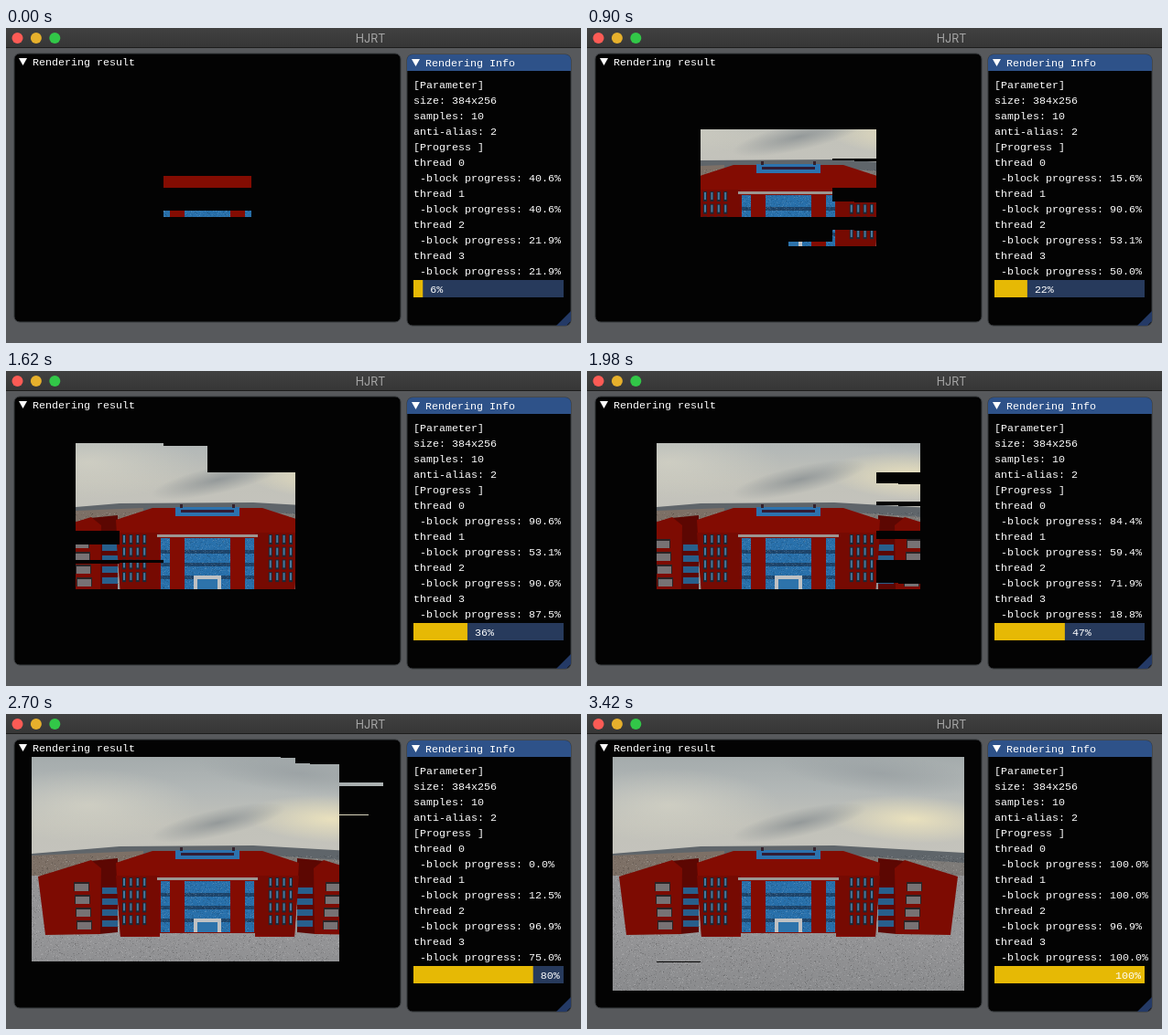
An HTML page with a canvas that plays this animation: 628 px wide and 345 px high, repeating every 3.6 s.

```html
<!DOCTYPE html>
<html lang="en">
<head>
<meta charset="utf-8">
<title>HJRT</title>
<style>
html, body { margin: 0; width: 100%; height: 100%; overflow: hidden; background: #57595c; }
canvas { display: block; }
</style>
</head>
<body>
<canvas id="stage" width="628" height="345"></canvas>
<script>
const W = 628, H = 345, STEP = 180, STEPS = 20;
const LEFT = 28, TOP = 47, BW = 48, BH = 32;
const MONO = '11.667px "Liberation Mono", monospace';
const g = document.getElementById('stage').getContext('2d');

// ---- drawing helpers
function rect(c, color, x, y, w, h) {
  c.fillStyle = color;
  c.fillRect(x, y, w, h);
}
function poly(c, color, ...p) {
  c.fillStyle = color;
  c.beginPath();
  for (let i = 0; i < p.length; i += 2) c.lineTo(p[i], p[i + 1]);
  c.fill();
}
function blob(c, rgb, a, x, y, rx, ry, tilt = 0) {
  c.save();
  c.translate(x, y);
  c.rotate(tilt);
  c.scale(rx, ry);
  const f = c.createRadialGradient(0, 0, 0, 0, 0, 1);
  f.addColorStop(0, `rgba(${rgb},${a})`);
  f.addColorStop(1, `rgba(${rgb},0)`);
  rect(c, f, -1, -1, 2, 2);
  c.restore();
}
function vertical(c, y0, y1, ...colors) {
  const f = c.createLinearGradient(0, y0, 0, y1);
  colors.forEach((color, i) => f.addColorStop(i / (colors.length - 1), color));
  return f;
}
function text(s, x, y, color = '#fff') {
  g.fillStyle = color;
  g.fillText(s, x, y);
}
let seed = 7;
const rnd = () => (seed = (seed * 16807) % 2147483647) / 2147483647;
function grain(c, n, x, y, w, h, a) {
  while (n--) {
    const v = rnd() < .5 ? 255 : 0;
    rect(c, `rgba(${v},${v},${v},${rnd() * a})`, x + Math.floor(rnd() * w), y + Math.floor(rnd() * h), 1, 1);
  }
}

// ---- the finished rendering, in stage coordinates
function halfBuilding(c) {
  // outer wing with its inner side
  poly(c, '#5c0702', 92, 161, 122, 158, 122, 239, 102, 241);
  poly(c, '#7d0b02', 35, 178, 93, 160, 104, 169, 103, 241, 43, 242);
  for (let i = 0; i < 4; i++) {
    rect(c, '#2a2426', 74 + i, 184 + i * 14, 17, 10);
    rect(c, '#777274', 75 + i, 186 + i * 14, 15, 8);
    rect(c, '#285f8c', 105, 190 + i * 12, 17, 7);
  }
  // main body and tower
  poly(c, '#830c02', 120, 163, 160, 150, 220, 150, 220, 240, 168, 240, 168, 244, 125, 244);
  poly(c, '#760a02', 120, 177, 168, 177, 168, 242, 125, 244);
  for (let i = 0; i < 16; i++) {
    const x = 127 + (i % 4) * 7.4, y = 179 + Math.floor(i / 4) * 13.7;
    rect(c, '#1c2836', x, y, 4, 11);
    rect(c, '#48789c', x + 1, y + 1, 2, 8);
  }
  // glazed centre between pillars
  for (const [x, w] of [[169, 10], [195, 25]]) {
    rect(c, '#2870ab', x, 183, w, 56);
    for (let y = 196; y < 230; y += 14) rect(c, '#1d456c', x, y, w, 4);
    grain(c, w * 28, x, 183, w, 56, .14);
  }
  rect(c, '#9c9692', 165, 179, 55, 3);
  rect(c, '#bfc1c3', 205, 224, 15, 15);
  rect(c, '#2d73ab', 209, 228, 11, 11);
  // roof sign
  rect(c, '#2c72ae', 185, 149, 35, 10);
  rect(c, '#321d35', 191, 152, 29, 3);
  rect(c, '#35212b', 190, 146, 3, 4);
}
function paintScene() {
  const cv = document.createElement('canvas');
  cv.width = W;
  cv.height = H;
  const c = cv.getContext('2d');
  c.rect(LEFT, TOP, 8 * BW, 8 * BH);
  c.clip();
  rect(c, vertical(c, 47, 158, '#a4abac', '#b3b8b7', '#c2c2ba', '#c4c3bc'), 28, 47, 384, 112);
  blob(c, '214,212,198', .7, 90, 100, 120, 40);
  blob(c, '240,230,190', .85, 355, 115, 95, 26, .05);
  blob(c, '150,157,160', .7, 320, 65, 110, 22, .1);
  blob(c, '140,146,148', .85, 232, 119, 75, 15, -.22);
  // land, sea and ground
  poly(c, '#5f656a', 28, 153, 124, 145, 270, 144, 412, 152, 412, 185, 28, 185);
  poly(c, '#7d7066', 28, 155, 150, 150, 150, 180, 28, 180);
  poly(c, '#7e7b78', 290, 155, 412, 163, 412, 190, 290, 190);
  rect(c, vertical(c, 176, 303, '#939395', '#959597', '#8a8b8d'), 28, 177, 384, 126);
  grain(c, 14000, 28, 155, 384, 148, .18);
  halfBuilding(c);
  c.translate(440, 0);
  c.scale(-1, 1);
  halfBuilding(c);
  return cv;
}
const scene = paintScene();

// ---- blocks spiral clockwise out of the middle
const blocks = [[3, 3], [4, 3], [4, 4], [3, 4]];
for (let lo = 2, hi = 5; lo >= 0; lo--, hi++) {
  for (let y = hi - 1; y >= lo; y--) blocks.push([lo, y]);
  for (let x = lo + 1; x <= hi; x++) blocks.push([x, lo]);
  for (let y = lo + 1; y <= hi; y++) blocks.push([hi, y]);
  for (let x = hi - 1; x >= lo; x--) blocks.push([x, hi]);
}
// key points: step, then rows finished by each thread
const keys = [
  [0, 13, 13, 7, 7],
  [2, 36, 31, 22, 30],
  [3, 50, 130, 29, 97],
  [7, 88, 185, 70, 128],
  [8, 94, 194, 81, 142],
  [9, 253, 209, 93, 156],
  [13, 378, 278, 209, 241],
  [16, 532, 443, 375, 444],
  [19, 608, 512, 447, 480]
];
// read column `to` where column `from` has the value v
function along(from, to, v) {
  const i = Math.max(1, keys.findIndex(k => k[from] >= v));
  const a = keys[i - 1], b = keys[i];
  return a[to] + (b[to] - a[to]) * (v - a[from]) / (b[from] - a[from]);
}
// a thread that becomes free takes the next block of the spiral
const queues = [[], [], [], []];
queues
  .flatMap((_, t) => {
    const count = Math.ceil(keys.at(-1)[t + 1] / BH);
    return Array.from({ length: count }, (_, k) => ({ t, at: along(t + 1, 0, k * BH) }));
  })
  .sort((a, b) => Math.max(0, a.at) - Math.max(0, b.at))
  .forEach((job, id) => queues[job.t].push(id));

// rows appear from the bottom of a block upwards
function drawBlock(id, rows) {
  const x = LEFT + blocks[id][0] * BW, bottom = TOP + (blocks[id][1] + 1) * BH;
  const full = Math.floor(rows), part = Math.floor((rows - full) * BW);
  const copy = (y, w, h) => w > 0 && h > 0 && g.drawImage(scene, x, y, w, h, x, y, w, h);
  copy(bottom - full, BW, full);
  copy(bottom - full - 1, part, 1);
}
// one decimal, ties to even
function percent(rows) {
  const v = rows / BH * 100;
  return (v % 1 === .25 ? v - .01 : v).toFixed(1) + '%';
}
function panel(x, y, w, h) {
  g.fillStyle = '#030303';
  g.strokeStyle = '#35383b';
  g.lineWidth = 1;
  g.beginPath();
  g.roundRect(x, y, w, h, 6);
  g.fill();
  g.stroke();
}
function drawWindows() {
  rect(g, '#57595c', 0, 0, W, H);
  rect(g, vertical(g, 0, 22, '#414141', '#363636'), 0, 0, W, 22);
  rect(g, '#1d1d1d', 0, 21, W, 1);
  ['#fc5b55', '#e6b02c', '#32c748'].forEach((color, i) => {
    g.fillStyle = color;
    g.beginPath();
    g.arc(12.5 + i * 20.4, 11, 6, 0, 7);
    g.fill();
  });
  g.font = '12.5px Inter, sans-serif';
  g.textAlign = 'center';
  text('HJRT', 398, 15.5, '#a5a5a5');
  g.textAlign = 'left';
  g.font = MONO;
  panel(9, 28, 422, 294);
  panel(438, 29, 179, 297);
  g.fillStyle = '#2e5289';
  g.beginPath();
  g.roundRect(438, 29, 179, 18, [6, 6, 0, 0]);
  g.fill();
  poly(g, '#243a66', 617, 310, 617, 321, 612, 326, 601, 326);
  poly(g, '#fff', 14, 33, 23, 33, 18.5, 41);
  poly(g, '#fff', 443, 34, 452, 34, 447.5, 42);
  text('Rendering result', 29, 41);
  text('Rendering Info', 458, 42);
}
function draw(step) {
  const lines = ['[Parameter]', 'size: 384x256', 'samples: 10', 'anti-alias: 2', '[Progress ]'];
  let started = 0;
  drawWindows();
  queues.forEach((queue, t) => {
    const done = along(0, t + 1, step);
    const at = Math.min(Math.floor(done / BH), queue.length - 1);
    started += at + 1;
    for (let j = 0; j <= at; j++) drawBlock(queue[j], Math.min(BH, done - j * BH));
    lines.push('thread ' + t, ' -block progress: ' + percent(Math.floor(done - at * BH)));
  });
  lines.forEach((s, i) => text(s, 445, 66 + i * 17));

  const part = started / blocks.length, fill = 164 * part;
  const label = Math.round(part * 100) + '%';
  rect(g, '#273a5c', 445, 276, 164, 19);
  rect(g, '#e6b905', 445, 276, fill, 19);
  text(label, Math.min(445 + fill + 8, 605 - label.length * 7), 290);
}
function tick() {
  draw(Math.floor(performance.now() / STEP) % STEPS);
  requestAnimationFrame(tick);
}
tick();
</script>
</body>
</html>
```
